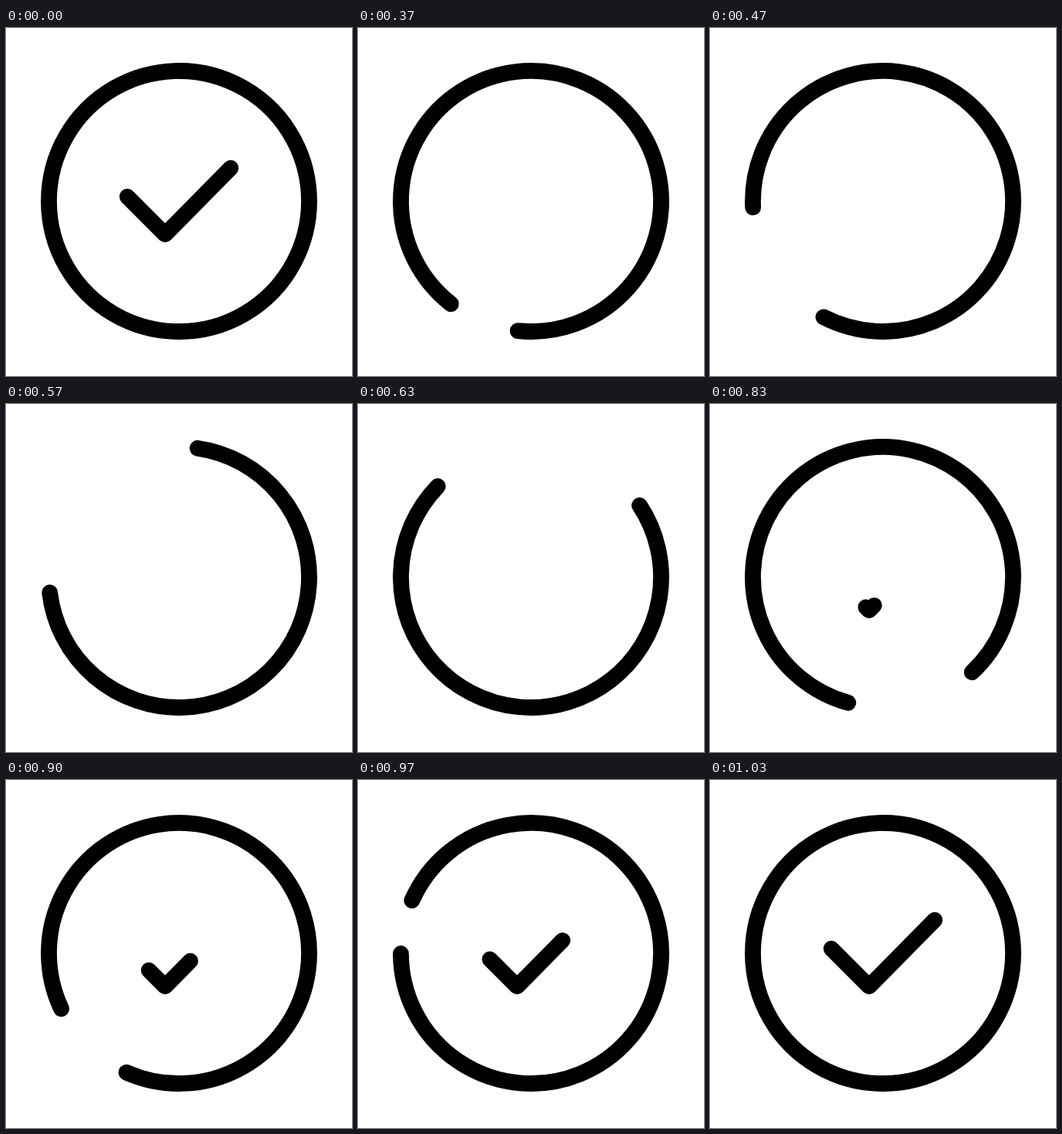
Recreate the animation shown at these times as an HTML page. Size 448 px wide and 450 px high, loop 1060 ms.

```html
<!DOCTYPE html>
<html lang="en">
<head>
<meta charset="utf-8">
<title>Loading check</title>
<style>
  html, body { margin: 0; width: 100%; height: 100%; overflow: hidden; background: #fff; }
  svg { display: block; width: 448px; height: 450px; }
  path { fill: none; stroke: #000; stroke-linecap: round; stroke-linejoin: round; }
</style>
</head>
<body>
<svg viewBox="0 0 448 450">
  <path id="ring" stroke-width="20.8"/>
  <path id="check" stroke-width="20.4"/>
</svg>
<script>
  const LOOP = 1060, FIRST = 11, LAST = 31;
  const CENTER = 224, RADIUS = 168.5;

  // Step, then the angles where the gap opens and ends, clockwise from the right.
  const GAP = [
    [11, 95.8, 128],
    [14, 117.2, 177.3],
    [17, 173.2, 278.2],
    [22, 309.9, 392.7],
    [27, 473.8, 514.8],
    [31, 606, 613]
  ];
  // Step, then the drawn share of the short and the long arm.
  const ARMS = [[24.5, 0, 0], [27, 0.43, 0.385], [31, 1, 1]];

  const ring = document.getElementById('ring');
  const check = document.getElementById('check');

  function slope(keys, i, col) {
    const a = keys[Math.max(i - 1, 0)];
    const b = keys[Math.min(i + 1, keys.length - 1)];
    return (b[col] - a[col]) / (b[0] - a[0]);
  }

  // Cubic curve through the keys.
  function curve(keys, step, col) {
    let i = 0;
    while (i < keys.length - 2 && step >= keys[i + 1][0]) i++;
    const a = keys[i], b = keys[i + 1], span = b[0] - a[0];
    const u = (step - a[0]) / span, v = 1 - u;
    return v * v * (1 + 2 * u) * a[col] + u * u * (1 + 2 * v) * b[col]
      + span * u * v * (v * slope(keys, i, col) - u * slope(keys, i + 1, col));
  }

  // Steps run at 30 per second, rounded to 10 ms.
  function stepAt(time) {
    let step = 0;
    while (step < LAST && Math.round((step + 1) * 10 / 3) * 10 <= time) step++;
    return step;
  }

  function point(angle) {
    const a = angle * Math.PI / 180;
    return `${CENTER + RADIUS * Math.cos(a)} ${CENTER + RADIUS * Math.sin(a)}`;
  }

  function arc(from, to) {
    const r = `A${RADIUS} ${RADIUS} 0 0 1 `;
    const mid = (to - from) / 3;
    return `M${point(from)}${r}${point(from + mid)}${r}${point(from + 2 * mid)}${r}${point(to)}`;
  }

  function tick(short, long) {
    return `M${206 - 49 * short} ${267 - 49 * short}L206 267L${206 + 85 * long} ${267 - 86 * long}`;
  }

  function draw(step) {
    if (step < FIRST || step >= LAST) {
      ring.setAttribute('d', arc(0, 360) + 'Z');
      check.setAttribute('d', tick(1, 1));
      return;
    }
    ring.setAttribute('d', arc(curve(GAP, step, 2), curve(GAP, step, 1) + 360));
    check.setAttribute('d', step > ARMS[0][0]
      ? tick(curve(ARMS, step, 1), curve(ARMS, step, 2)) : '');
  }

  const start = performance.now();
  function frame() {
    draw(stepAt((performance.now() - start) % LOOP));
    requestAnimationFrame(frame);
  }
  frame();
</script>
</body>
</html>
```
